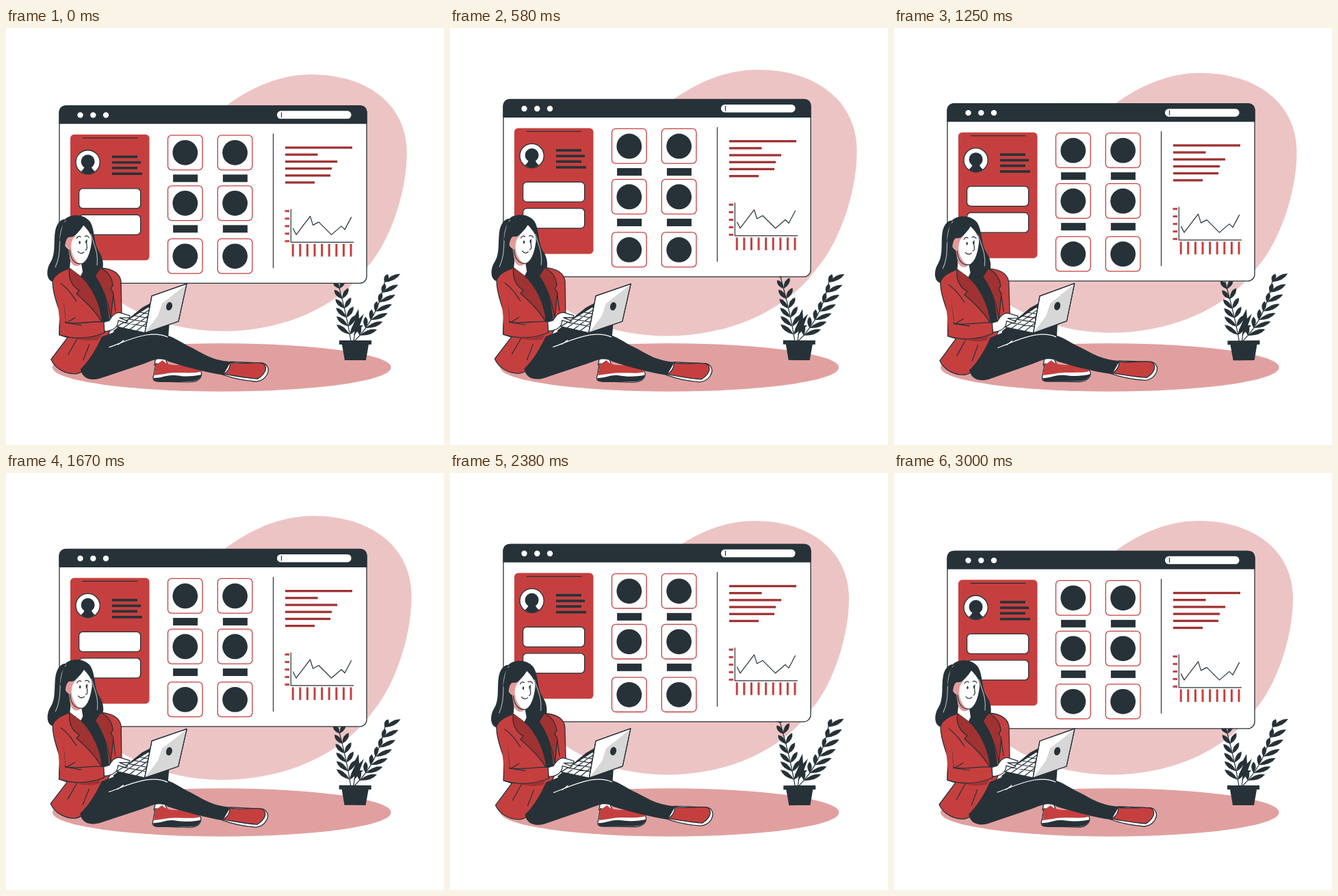
These frames come from a looping animation (640 px wide and 610 px high, 3040 ms). An HTML page:

```html
<!DOCTYPE html>
<html lang="en">
<head>
<meta charset="utf-8">
<title>Dashboard illustration</title>
<style>
  html, body { margin: 0; width: 100%; height: 100%; overflow: hidden; background: #fff; }
  svg { display: block; width: 100vw; height: 100vh; }
  .dark { fill: #263238; }
  .red { fill: #c63f3f; }
  .deep { fill: #a03232; }
  .white { fill: #fff; }
  .pink { fill: #e59a9a; }
  .ink { stroke: #263238; stroke-width: 1.3; stroke-linejoin: round; stroke-linecap: round; }
  .line { fill: none; stroke: #263238; stroke-width: 1.2; stroke-linejoin: round; stroke-linecap: round; }
  .light { stroke: #fff; }
  .shine { stroke: #aab0b3; }
</style>
</head>
<body>
<svg viewBox="0 0 640 610">
  <path id="blob" fill="#edc4c4" d="M445 70C525 70 583 113 583 183C583 243 557 313 528 346C488 403 410 441 318 441.500C235 441 180 411 140 378C103 340 103 250 150 210C200 180 265 160 325 113C360 88 400 70 445 70Z"/>
  <ellipse id="shadow" cx="315.300" cy="496.500" rx="247.300" ry="35.300" fill="#e1a0a0"/>

  <g id="plant" class="dark">
    <g id="leaves"></g>
    <path class="line" d="M504 458Q498 420 483 366M509 458Q543 425 553 372M508 458L513 425"/>
    <path d="M515 411L516 425L523 418L517 435L522 435L508 450L511 439L504 441L510 428L505 430Z"/>
    <path d="M487 457H534V463H530L526 486H495L491 463H487Z"/>
  </g>

  <g id="window">
    <rect class="white ink" x="78" y="113.500" width="449" height="259.500" rx="10"/>
    <path class="dark" d="M77.500 140V124Q77.500 113 88.500 113H517Q527.500 113 527.500 124V140Z"/>
    <g class="white">
      <circle cx="108.500" cy="127" r="4.200"/><circle cx="127.300" cy="127" r="4.200"/><circle cx="146" cy="127" r="4.200"/>
      <rect x="396" y="121" width="108.500" height="11.500" rx="5.500"/>
    </g>
    <path class="line" d="M402.500 123.500V130"/>

    <rect class="red" x="94" y="155.500" width="115.500" height="184" rx="5.500"/>
    <path class="line" d="M112 160.500H192"/>
    <circle class="white ink" cx="119.600" cy="196" r="17.600"/>
    <g class="dark">
      <circle cx="119.600" cy="195" r="10"/>
      <path d="M115 201H124.500Q125 206 130 209.500Q119.600 217.500 109.500 209.500Q114.500 206 115 201Z"/>
    </g>
    <g class="white ink">
      <rect x="106.600" y="234.500" width="90" height="29" rx="5.500"/>
      <rect x="106.600" y="273" width="90" height="29" rx="5.500"/>
    </g>
    <g id="details"></g>

    <path class="line" d="M390.500 154.500V350.500M416.300 265V313H507.500M419.500 293L424 302L444.500 275L448.500 288L457 283.500L475.500 302L490 289.500L495 294.500L504.500 276.500"/>
  </g>

  <g id="woman">
    <path class="dark" d="M86 280C93 272 114 271 123 284C130 296 128 315 135 326C145 340 144 359 132 364L108 362L92 351C88 367 76 374 67 371C58 367 59 352 65 343C73 330 69 312 72 296C74 287 79 280 86 280Z"/>
    <path class="line shine" d="M87 282C72 303 84 325 72 350M124 302C129 319 135 329 133 347"/>

    <path class="red ink" d="M92 352C80 356 71 361 68 370C68 386 74 402 79 417L78 449L90 453L66 485C72 499 88 507 103 506C121 502 137 476 148 451L157 433L169 417L168 371C166 356 151 352 138 351L132 363L108 361Z"/>
    <path class="dark" d="M106 361L129 357C142 377 149 402 151 428L145 440L137 420Q124 384 106 361Z"/>
    <path class="deep ink" d="M93 351C90 365 96 378 107 384L103 389C117 401 132 416 141 432C139 405 126 378 108 362Z"/>
    <path class="deep ink" d="M138 351C148 356 155 364 156 377L153 381L157 388L153 425C149 399 141 379 130 363Z"/>

    <path class="white" d="M97 304L92 307C83 306 83 320 92 324L94 341L93 351L109 363L112 357L110 345C119 342 123 328 125 313C126 303 119 295 113 289C108 297 103 302 97 304Z"/>
    <path class="pink" d="M95 305C85 303 81 316 91 323L94 341C97 348 103 351 109 346C100 341 96 331 95 321C96 313 96 308 103 304Z"/>
    <path class="dark" d="M112 284C108 297 101 307 94 306C88 305 87 313 86 319L78 311L83 286L98 275Z"/>
    <path class="line" d="M118 310C116 318 121 323 116 325M105 327Q109 332 114 328M103 308Q106 303 109 306M115 305Q119 303 121 307M93 325C94 338 100 346 110 345"/>
    <g class="dark"><ellipse cx="107.500" cy="314" rx="1.200" ry="2.300"/><ellipse cx="117" cy="313" rx="1.100" ry="2.300"/></g>

    <path class="white ink" d="M219 483L217 493L238 496L233 484Z"/>
    <path class="white ink" d="M219 491L216 508C213 516 218 518 229 517L269 518C282 518 288 510 285 502Z"/>
    <path class="red" d="M229 486C234 493 244 493 255 493C268 495 281 496 285 502C277 507 249 502 232 506L217 508L219 493Z"/>
    <path class="dark" d="M216 512C229 512 234 507 247 508C260 510 274 510 286 507C283 515 277 517 268 517L222 517Q216 517 216 512Z"/>
    <path class="dark" d="M157 443L199 409L210 403L216 407L239 429L237 454L164 470Z"/>
    <path class="dark" d="M140 452L160 444C175 443 198 449 219 447C239 447 249 456 266 465C286 474 298 486 329 488L323 508C296 505 257 494 238 488C224 479 212 488 196 493L137 513C121 517 111 511 109 499C120 489 131 472 140 452Z"/>
    <path class="line light" d="M151 467C162 464 179 454 205 449C219 447 230 449 236 452M164 463L172 457"/>
    <path class="white ink" d="M328 488L317 507C336 514 353 516 366 517C381 515 386 501 382 495Q380 491 375 490Z"/>
    <path class="red ink" d="M328 489C343 492 360 488 375 490C384 496 379 506 368 513C352 512 337 509 318 506C325 502 328 497 328 489Z"/>

    <path class="white ink" d="M162 437L208 408L215 414L203 446Z"/>
    <path class="line" d="M172 431L207 437M180 426L209 431M188 421L211 425M196 416L213 419M171 439L211 411M181 441L213 417M191 443L211 427"/>
    <path class="white ink" d="M213 392L264 374L252 429L203 446Z"/>
    <path fill="#d7d7d7" d="M263 375.500L251.500 428.500L204 445L222 421L228 403Z"/>
    <path class="line" d="M213 392L264 374L252 429L203 446Z"/>
    <ellipse class="dark" cx="238.500" cy="407" rx="4.400" ry="6.200" transform="rotate(15 238.500 407)"/>

    <path class="white ink" d="M141 431L151 428C156 419 162 415 168 417L181 421L180 424L166 424L178 429L174 431L164 428C164 437 157 443 144 444Z"/>
    <path class="red ink" d="M80 383C83 397 86 416 87 431C105 434 124 429 143 430L144 446C125 454 103 457 78 449L79 416Z"/>
    <path class="red" d="M73 375L82 381L87 428L80 446Z"/>
    <path class="deep" d="M101 454C115 455 129 453 139 449L135 456C124 458 112 458 101 454Z"/>
    <path class="line" d="M80 374C93 383 97 392 103 400M88 432L101 424M87 431L110 435M104 455L91 478M113 486L122 463M157 391L160 414"/>
  </g>
</svg>
<script>
const $ = id => document.getElementById(id);
const rect = (cls, x, y, w, h) => `<rect class="${cls}" x="${x}" y="${y}" width="${w}" height="${h}"/>`;
const mix = (a, b, u) => a + (b - a) * u;

function buildDetails() {
  let out = '';
  [[188, 37], [196.3, 42], [204.4, 37], [212.8, 44]].forEach(([y, w]) => out += rect('dark', 155, y - 1.8, w, 3.6));
  [98, 47.5, 76, 68, 66, 43].forEach((w, i) => out += rect('deep', 408, 173 + i * 10.2, w, 3.3));
  for (let i = 0; i < 5; i++) out += rect('red', 407.5, 266 + i * 11, 6.5, 3);
  for (let i = 0; i < 9; i++) out += rect('red', 417.7 + i * 10.6, 315.5, 3, 18.5);
  for (const x of [236.5, 309.3]) {
    for (const y of [156.5, 230.5, 308]) {
      out += `<rect x="${x}" y="${y}" width="50.6" height="50.7" rx="5.5" fill="#fff" stroke="#c63f3f" stroke-width="1.3"/>
        <circle class="dark" cx="${x + 25.3}" cy="${y + 25.5}" r="18.4"/>`;
    }
    for (const y of [214, 288]) out += rect('dark', x + 7.6, y, 36, 11);
  }
  return out;
}

const leaf = (x, y, angle, len, w) =>
  `<path transform="translate(${x} ${y}) rotate(${angle})" d="M0 0Q${len * 0.6} ${-w} ${len} 0Q${len * 0.6} ${w} 0 0Z"/>`;

// Pairs of leaves along a quadratic stem; each side is [angle low, angle top, length low, length top].
function branch(a, b, c, count, sides) {
  let out = '';
  for (let i = 0; i < count; i++) {
    const u = mix(0.12, 1, i / (count - 1));
    const [x, y] = [0, 1].map(k => mix(mix(a[k], b[k], u), mix(b[k], c[k], u), u));
    for (const [a0, a1, l0, l1] of sides) out += leaf(x, y, mix(a0, a1, u), mix(l0, l1, u), 6.5);
  }
  return out;
}

$('details').innerHTML = buildDetails();
$('leaves').innerHTML =
  branch([504, 458], [498, 420], [483, 366], 7, [[-145, -125, 26, 14], [-55, -62, 20, 18]]) +
  branch([509, 458], [543, 425], [553, 372], 7, [[-18, -28, 27, 26], [-98, -68, 18, 13]]);

// Linear interpolation through [time, value] stops.
function track(stops, t) {
  const i = Math.max(1, stops.findIndex(s => s[0] >= t));
  const [[t0, v0], [t1, v1]] = [stops[i - 1], stops[i]];
  return mix(v0, v1, (t - t0) / (t1 - t0));
}

const LOOP = 3040, STEP = 1000 / 24;
const beat = [[0, 1], [300, 1.1], [900, 1], [1200, 1], [1500, 1.1], [1800, 1], [3000, 1]];
const float = [[0, 0.9], [750, -11.3], [1500, 0.9]];
const sway = [[0, 0], [375, 1], [1125, -1], [1500, 0]];

function draw(now) {
  const frame = Math.floor((now % LOOP + 5) / STEP);
  const t = 34 + Math.min(frame, 72) * STEP * 0.988;
  const half = t % 1500;
  const angle = track(sway, half);
  const scale = track(beat, t);
  const hump = half > 375 && half < 1125 ? Math.sin(Math.PI * (half - 375) / 750) ** 2 : 0;
  $('blob').setAttribute('transform', `translate(343 255) scale(${scale}) translate(-343 -255)`);
  $('shadow').setAttribute('transform', `translate(${hump * 8} 0)`);
  $('window').setAttribute('transform', `translate(0 ${track(float, half)})`);
  $('woman').setAttribute('transform', `rotate(${angle} 222 396)`);
  $('plant').setAttribute('transform', `rotate(${angle} 526 424)`);
}

const start = performance.now();
function tick() {
  draw(performance.now() - start);
  requestAnimationFrame(tick);
}
draw(0);
requestAnimationFrame(tick);
</script>
</body>
</html>
```
